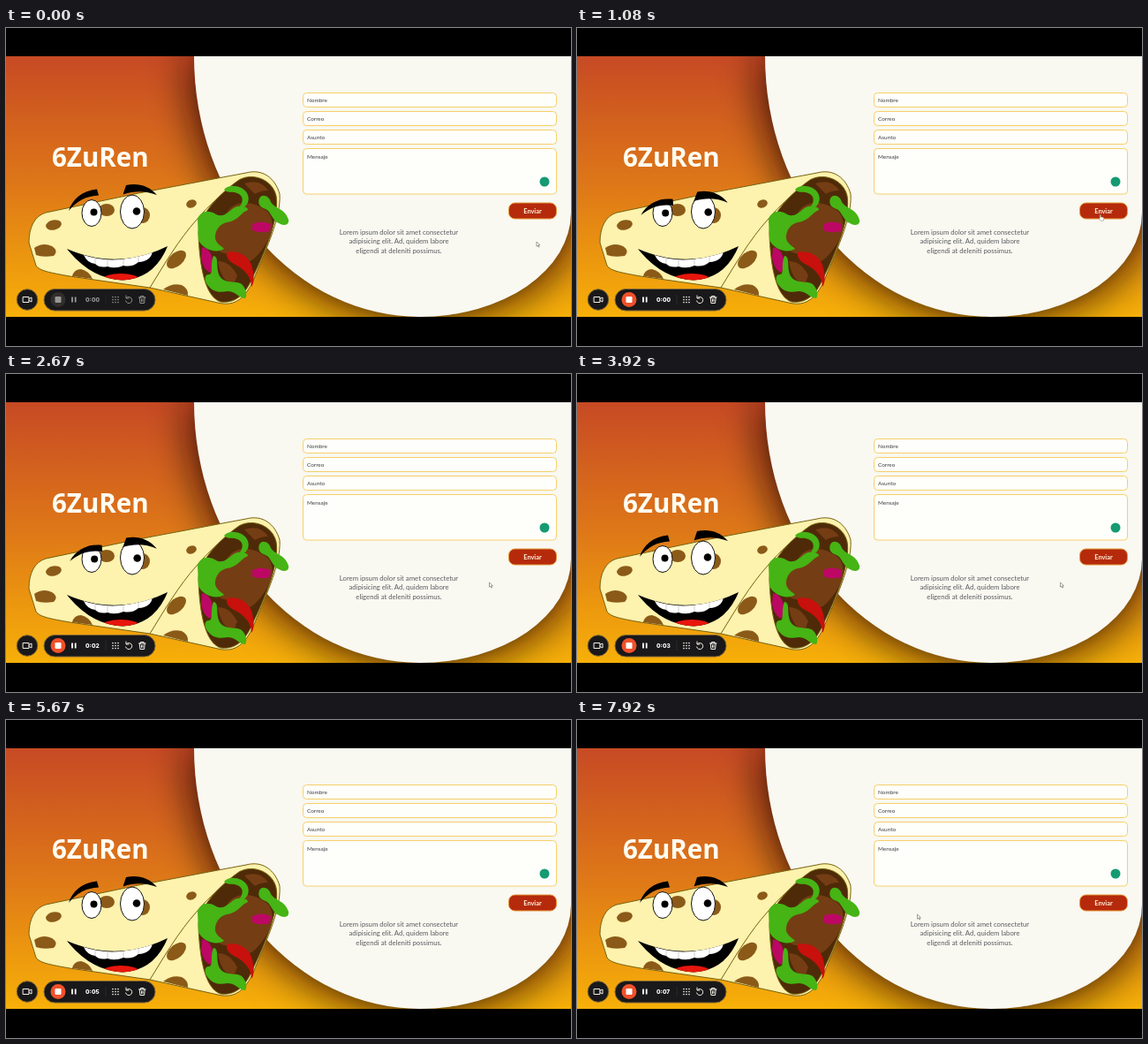
An HTML page that plays this animation: 640x360 px, repeating every 8 s.

```html
<!DOCTYPE html>
<html lang="es">
<head>
<meta charset="utf-8">
<title>Contacto</title>
<style>
  html, body { margin: 0; width: 100%; height: 100%; overflow: hidden; background: #000; }
  svg { display: block; width: 100vw; height: 100vh; }
  text { font-family: Lato, "Open Sans", sans-serif; }
  .title { font: 700 29.500px "Open Sans", sans-serif; fill: #fffdf2; }
  .field rect { fill: #fefefb; stroke: #f5d06a; stroke-width: 1; }
  .field text { font-size: 6.4px; fill: #3b3d40; }
  .lorem { font-size: 7.75px; fill: #5a5c60; text-anchor: middle; }
  .outline { stroke: #77620f; stroke-width: 1; stroke-linejoin: round; }
  .spot { fill: #8b5a18; }
  .leaf { fill: #45b414; }
  .icon { fill: none; stroke: #f4f1e8; stroke-width: 1; stroke-linecap: round; stroke-linejoin: round; }
</style>
</head>
<body>
<svg viewBox="0 0 640 360">
  <defs>
    <linearGradient id="sky" x1="0" y1="0" x2="0" y2="1">
      <stop offset="0" stop-color="#c74a24"/>
      <stop offset=".5" stop-color="#de7818"/>
      <stop offset="1" stop-color="#f7b008"/>
    </linearGradient>
    <filter id="blur" x="-30%" y="-30%" width="160%" height="160%"><feGaussianBlur stdDeviation="25"/></filter>
    <clipPath id="page"><rect y="32" width="640" height="295"/></clipPath>
    <path id="blob" d="M213 32A256 295 0 0 0 469 327A171 118 0 0 0 640 209V32Z"/>
    <path id="mouth" d="M69 250Q126 275 183 247Q168 284 132 285.500Q96 284 69 250Z"/>
    <clipPath id="inMouth"><use href="#mouth"/></clipPath>
    <path id="opening" d="M264 172C280 163 302 172 306 190C310 214 295 250 280 281C271 303 259 312 243 310C225 304 219 268 218 232C218 211 245 185 264 172Z"/>
    <clipPath id="inOpening"><use href="#opening"/></clipPath>
  </defs>

  <rect width="640" height="360"/>
  <g clip-path="url(#page)">
    <rect y="32" width="640" height="295" fill="url(#sky)"/>
    <use href="#blob" fill="#140500" filter="url(#blur)"/>
    <use href="#blob" fill="#f9f8f1"/>

    <text class="title" x="52" y="157">6ZuRen</text>

    <g id="form"></g>
    <circle cx="610" cy="174" r="5.500" fill="#159a72"/>
    <rect x="569.500" y="198" width="54" height="18" rx="7" fill="#b62a0c" stroke="#e59a3a"/>
    <text x="596.500" y="209.500" font-size="7.400" font-weight="700" fill="#fff3df" text-anchor="middle">Enviar</text>
    <text class="lorem" x="445" y="233.500">Lorem ipsum dolor sit amet consectetur</text>
    <text class="lorem" x="445" y="244">adipisicing elit. Ad, quidem labore</text>
    <text class="lorem" x="445" y="254.500">eligendi at deleniti possimus.</text>

    <g id="wrap">
      <path class="outline" fill="#fdf2ae" d="M26 243C26 226 32 213 45 209L150 187L272 164C291 159 305 170 310 188C312 216 291 258 280 286C271 305 260 316 240 311L163 294L72 281C50 277 38 275 34 269Z"/>
      <g class="spot">
        <ellipse cx="54" cy="223" rx="9" ry="5.500" transform="rotate(-12 54 223)"/>
        <path d="M32 249Q42 242 52 247Q60 252 54 258Q41 260 34 257Z"/>
        <ellipse cx="114" cy="206" rx="9" ry="7"/>
        <ellipse cx="155" cy="212" rx="8" ry="9"/>
        <ellipse cx="210" cy="199" rx="6" ry="4.500" transform="rotate(-20 210 199)"/>
        <ellipse cx="193" cy="262" rx="13" ry="7.500" transform="rotate(-42 193 262)"/>
        <path d="M75 281Q77 273 85 273Q94 275 98 284Z"/>
        <path d="M178 296Q188 288 199 291Q207 295 206 303Z"/>
      </g>
      <path class="outline" fill="none" d="M163 294C179 268 196 239 216 217C229 201 247 186 266 171"/>
      <use href="#opening" class="outline" fill="#4f2a08"/>
      <path fill="#753d14" d="M250 210C258 194 279 196 290 204C304 209 304 228 297 240C290 252 282 262 276 264C258 250 244 262 236 246C232 232 240 216 250 210ZM240 264Q254 264 262 280L258 290Q244 288 240 264Z"/>
      <path fill="#753d14" d="M270 176Q288 170 297 184Q288 184 282 188Z"/>
      <path fill="#bd0765" d="M222 248Q232 250 234 262Q236 272 231 277Q223 273 221 260ZM279 222Q288 217 300 222L299 230Q287 233 279 229Z"/>
      <path class="leaf" d="M247 183C252 176 268 178 273 187C278 196 271 206 263 204C268 199 270 192 264 188C257 184 252 188 247 183Z"/>
      <path class="leaf" d="M217 217C220 206 230 206 238 211C248 216 254 204 262 202C269 201 274 203 274 206C266 209 262 219 250 220C242 222 238 228 237 235C236 243 243 246 247 250C238 256 222 250 218 240Z"/>
      <path class="leaf" d="M287 193C290 187 298 190 300 197C305 205 316 204 320 217C321 224 314 224 309 221C302 219 300 207 294 205C287 203 285 198 287 193Z"/>
      <path class="leaf" d="M235 258C242 259 237 271 242 281C249 291 262 285 268 291C273 297 273 303 271 306C264 306 260 298 251 298C244 299 236 300 230 293C224 287 224 279 230 279C235 279 231 267 235 258Z"/>
      <path fill="#c8100c" d="M250 254C260 251 273 256 278 268C281 278 282 288 278 293C278 282 270 273 260 268C253 265 249 260 250 254Z"/>

      <ellipse cx="97" cy="209.500" rx="11" ry="15" fill="#fff" stroke="#111"/>
      <ellipse cx="143" cy="208" rx="13.500" ry="19" fill="#fff" stroke="#111"/>
      <g id="pupils"><circle cx="99.500" cy="208.500" r="4"/><circle cx="148" cy="207.500" r="4.300"/></g>
      <path id="browL" d="M71 207C75 194 86 184 103 182.500L105 189.500C91 190 80 196 71 207Z"/>
      <path id="browR" d="M132.500 188.500L136 178C148 175 162 178 171 189C158 184 146 184 132.500 188.500Z"/>

      <use href="#mouth"/>
      <g clip-path="url(#inMouth)">
        <ellipse cx="130" cy="285" rx="21" ry="7" fill="#e8160d"/>
        <path fill="#fff" d="M88 257Q126 270 166 252Q165 264 150 265Q143 271 133 269Q124 273 115 270Q106 272 101 267Q92 266 88 257Z"/>
        <path fill="none" stroke="#999" stroke-width=".5" d="M101 260V267M115 262V270M133 262V269M150 259V265"/>
      </g>
    </g>
  </g>

  <g id="toolbar">
    <g fill="#19181a" stroke="#7d6434" stroke-width="1">
      <circle cx="24" cy="307.500" r="11.800"/>
      <rect x="43" y="295.500" width="126" height="24.500" rx="12.250"/>
    </g>
    <path class="icon" d="M19.500 304.500h6.500v6h-6.500zM26 306.500l3-1.500v5l-3-1.500"/>
    <g id="controls">
      <circle id="stop" cx="59" cy="307.500" r="8.500"/>
      <rect x="55.500" y="304" width="7" height="7" rx="1.200" fill="#fff"/>
      <path d="M75 304.500v6M78.700 304.500v6" stroke="#fff" stroke-width="1.800"/>
      <text id="clock" x="90" y="310" style="font:800 6.600px Inter,sans-serif" fill="#fff"></text>
      <path d="M113 302v11" stroke="#37342c" stroke-width=".7"/>
      <path class="icon" stroke-dasharray="0 3" style="stroke-width:1.700px" d="M121 304.500h6.500M121 307.500h6.500M121 310.500h6.500"/>
      <path class="icon" d="M136.500 305.500a3.600 3.600 0 1 1-.9 3.500M136 303v3h3"/>
      <path class="icon" d="M150.500 305h7.500M152.500 305v-1.500h3.500v1.500M151.300 305l.6 6.500h4.700l.6-6.500M153.500 307v2.500M155 307v2.500"/>
    </g>
  </g>

  <path id="arrow" fill="#fff" stroke="#77776c" stroke-width=".7" d="M0 0v5.200l1.300-1.100 1 2 .9-.4-1-2h1.700z"/>
  <path id="hand" fill="#fff" stroke="#77776c" stroke-width=".5" d="M1.500 0q.8 0 .8 1v1.700l3 .7q.7.200.5 1l-.6 2.800h-3l-2-2.300q.2-.7.800-.4l.2.200v-3.700q0-1 .8-1z"/>
</svg>
<script>
  const LOOP = 8000, RECORD_START = 250;
  const $ = id => document.getElementById(id);

  const fields = [['Nombre', 73.5, 16], ['Correo', 94.5, 16], ['Asunto', 115.5, 16], ['Mensaje', 136.5, 51.5]];
  $('form').innerHTML = fields.map(([label, y, h]) =>
    `<g class="field"><rect x="336.5" y="${y}" width="287" height="${h}" rx="4"/>
     <text x="341" y="${y + (h > 20 ? 11.5 : 10.5)}">${label}</text></g>`).join('');

  // time, x, y
  const pointer = [[0, 601, 242], [100, 601, 242], [480, 591, 212], [1700, 591, 210], [2400, 591, 210],
    [2650, 547.5, 236], [4700, 547.5, 236], [5200, 500, 232], [7100, 400, 230], [7600, 385.5, 220], [LOOP, 385.5, 220]];
  // time, amount the brows are lowered; they answer to the pointer on the button
  const brows = [[0, 0], [500, 0], [800, 1], [2670, 1], [2970, 0], [LOOP, 0]];

  const smooth = u => u * u * (3 - 2 * u);
  function sample(track, t) {
    const i = Math.max(1, track.findIndex(k => k[0] > t));
    const a = track[i - 1], b = track[i];
    const u = smooth((t - a[0]) / (b[0] - a[0]));
    return a.slice(1).map((v, n) => v + (b[n + 1] - v) * u);
  }
  const show = (el, on) => el.setAttribute('visibility', on ? 'visible' : 'hidden');

  function draw(t) {
    const [low] = sample(brows, t);
    $('browL').setAttribute('transform', `translate(${4 * low} ${8.5 * low}) rotate(${11 * low} 89 192)`);
    $('browR').setAttribute('transform', `translate(0 ${8 * low}) rotate(${2 * low} 150 184)`);
    $('pupils').setAttribute('transform', `translate(${0.7 * low} ${low})`);

    const recording = t >= RECORD_START;
    $('controls').setAttribute('opacity', recording ? 1 : 0.55);
    $('stop').setAttribute('fill', recording ? '#f0512a' : '#45413a');
    $('clock').textContent = '0:0' + Math.max(0, Math.floor((t - RECORD_START) / 1000));

    const [x, y] = sample(pointer, t);
    const onButton = x > 569 && y < 217;
    const onText = t > 4900 && t < 7300;
    for (const id of ['arrow', 'hand']) {
      $(id).setAttribute('transform', `translate(${x} ${y})`);
      show($(id), !onText && onButton === (id === 'hand'));
    }
  }

  const start = performance.now();
  function tick() {
    draw((performance.now() - start) % LOOP);
    requestAnimationFrame(tick);
  }
  tick();
</script>
</body>
</html>
```
